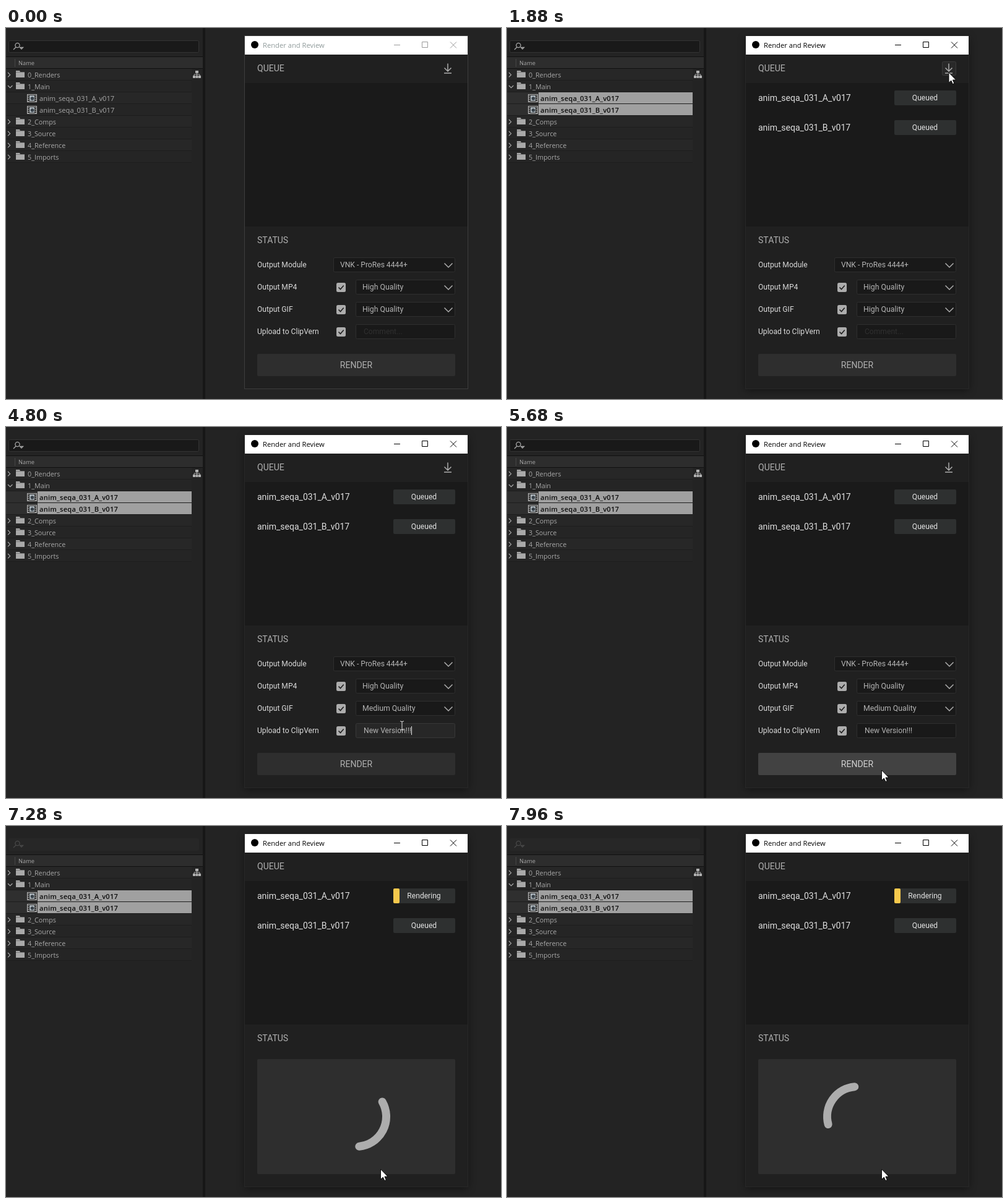
An HTML page for the animation above (8000 ms loop, 800x600 px).

```html
<!DOCTYPE html>
<html lang="en">
<head>
<meta charset="utf-8">
<title>Render queue</title>
<style>
  html, body { margin: 0; width: 100%; height: 100%; overflow: hidden; background: #232323; }
  svg { display: block; width: 800px; height: 600px; }
  text { white-space: pre; }
  .ui { font: 12.1px Roboto, sans-serif; }
  .quality { font-size: 12.3px; }
  .big { font: 14px Roboto, sans-serif; }
  .tree { font: 10.75px "Open Sans", sans-serif; fill: #a8a8a8; }
  .clip { font-size: 11.1px; }
  .picked { font-weight: 600; letter-spacing: .22px; fill: #0c0c0c; }
  .line { fill: none; stroke: #adadad; stroke-width: 1.5; }
  .off text { fill: #363636; }
  .off .box { stroke: none; }
  .off .chev { display: none; }
  .off .tick rect { fill: #343434; }
  .off .tick path { stroke: #1c1c1c; }
  .off .value { transform: translateX(-1px); }
</style>
</head>
<body>
<svg id="stage" viewBox="0 0 800 600"></svg>
<script>
const LOOP = 8000, STEP = 40;
const TYPED = 'New Version!!!';

const rect = (x, y, w, h, fill, more = '') =>
  `<rect x="${x}" y="${y}" width="${w}" height="${h}" fill="${fill}" ${more}/>`;
const text = (x, y, s, cls, fill, more = '') =>
  `<text x="${x}" y="${y}" class="${cls}" ${fill ? `fill="${fill}"` : ''} ${more}>${s}</text>`;
const line = (d, more = '', cls = '') => `<path class="line ${cls}" d="${d}" ${more}/>`;
const group = (id, body, more = '') => `<g id="${id}" ${more}>${body}</g>`;

// Project panel
const folder = y =>
  `<path d="M16 ${y - 7}h6l1 2h7v9h-14z" fill="#a9a9a9"/>` +
  rect(16, y - 5, 14, 0.8, '#6d6d6d');

const filmIcon = y =>
  rect(34.5, y - 6.5, 15, 12, '#2a2a2a', 'stroke="#b8b8b8"') +
  `<path d="M36.2 ${y - 5}v10M47.8 ${y - 5}v10" stroke="#b8b8b8" stroke-width="1.4" stroke-dasharray="1.4 1.6"/>` +
  rect(38, y - 5, 8, 9, '#a9b2b8') +
  `<circle cx="42.5" cy="${y}" r="2.8" fill="#39424a"/>`;

function treeRow(name, i) {
  const y = 76 + i * 19;
  const stripe = rect(0, y - 10, 300, 18, i % 2 ? '#252525' : '#272727') + rect(0, y + 8, 300, 1, '#1d1d1d');
  if (name.startsWith('anim')) {
    return stripe + filmIcon(y) + text(54, y + 4, name, 'tree clip') +
      group('pick' + i,
        rect(0, y - 10, 51, 18, '#2f2f2f') + rect(51, y - 10, 249, 18, '#a0a0a0') + filmIcon(y) +
        text(54, y + 4, name, 'tree clip picked'));
  }
  const arrow = i === 1 ? `M3 ${y - 2}l3.7 3.7l3.7 -3.7` : `M3 ${y - 4}l3.7 3.7l-3.7 3.7`;
  return stripe + line(arrow, 'style="stroke-width:1.1"') + folder(y) + text(35, y + 4, name, 'tree');
}

const tree = ['0_Renders', '1_Main', 'anim_seqa_031_A_v017', 'anim_seqa_031_B_v017',
  '2_Comps', '3_Source', '4_Reference', '5_Imports'];

const project =
  rect(0, 0, 800, 600, '#232323') +
  rect(4.5, 20.5, 307, 19, '#191919', 'id="search" rx="2" stroke="#343434"') +
  group('lens',
    '<circle cx="18.5" cy="28" r="3.6"/><path d="M16 31l-4 4"/><path d="M22.5 31.5h5l-2.5 2.5z"/>',
    'fill="none" stroke="#a8a8a8" stroke-width="1.3"') +
  rect(0, 46, 318, 1, '#101010') + rect(0, 47, 318, 18, '#2d2d2d') + rect(0, 65, 318, 1, '#101010') +
  rect(14, 50, 1, 13, '#464646') +
  text(20, 60, 'Name', 'tree', '', 'style="font-size:9.3px"') +
  tree.map(treeRow).join('') +
  rect(306, 69, 5, 4, '#b0b0b0') + rect(302, 77, 4, 4, '#b0b0b0') +
  rect(306.5, 77, 4, 4, '#b0b0b0') + rect(311, 77, 4, 4, '#b0b0b0') +
  line('M308.5 73v4M304 77v-2h9v2', 'style="stroke-width:1"') +
  rect(318, 0, 4, 600, '#171717');

// Tool window
const chevron = y => line(`M708.5 ${y - 2.5}l6.5 6.5l6.5 -6.5`, '', 'chev');
const field = (x, y, more = '') =>
  rect(x + 0.5, y - 11.5, 725 - x, 23, '#191919', `class="box" rx="2" stroke="#2f2f2f" ${more}`);
const combo = (x, y, value, cls = '', id = '') =>
  field(x, y) + text(x + 11, y + 4, value, `ui value ${cls}`, '#b4b4b4', id) + chevron(y);
const tick = y =>
  `<g class="tick">${rect(534, y - 7, 15, 15, '#adadad', 'rx="2.5"')}` +
  `<path d="M537.5 ${y + 0.5}l3 3l5.2 -6" fill="none" stroke="#1e1e1e" stroke-width="1.6"/></g>`;
const label = (y, s) => text(406, y + 4, s, 'ui', '#dadada');

const job = (y, name, id) =>
  text(406, y + 5, name, 'big', '#dedede') + rect(626, y - 12, 100, 24, '#2e3030', 'rx="2"') +
  (id ? rect(626, y - 12, 10, 24, '#f6c84c', 'id="bar" rx="2"') : '') +
  text(675.5, y + 4, 'Queued', 'ui', '#e2e2e2', `text-anchor="middle" ${id}`);

const option = (i, s) => text(576, 460 + i * 24, s, 'ui quality', '#a6a6a6', `id="opt${i}"`);

const win =
  rect(386, 13, 360, 570, '#202020', 'id="frame"') +
  rect(385.5, 12.5, 361, 571, 'none', 'id="edge"') +
  rect(386, 13, 360, 30, '#fff') +
  '<circle cx="402" cy="27" r="6" fill="#000"/>' +
  group('caption',
    text(415, 32, 'Render and Review', '', '', 'style="font:11.2px \'Open Sans\',sans-serif" stroke="none"') +
    '<path d="M627 27.5h10M672.5 22.5h9v9h-9zM718 22.5l10 10M728 22.5l-10 10" fill="none"/>') +
  rect(386, 89, 360, 232, '#1a1a1a') +
  text(406, 70, 'QUEUE', 'big', '#b0b0b0') +
  rect(703.5, 54.5, 22, 22, '#292929', 'id="addHot" rx="2" stroke="#3b3b3b"') +
  group('add', line('M714 57.5v12.5M708.5 64.5l5.5 5.5l5.5 -5.5M708 73h12')) +
  group('jobs', job(113, tree[2], 'id="state"') + job(161, tree[3], '')) +
  text(406, 348, 'STATUS', 'big', '#b0b0b0') +
  group('form',
    label(383, 'Output Module') + combo(529, 383, 'VNK - ProRes 4444+') +
    label(419, 'Output MP4') + tick(419) + combo(565, 419, 'High Quality', 'quality') +
    label(455, 'Output GIF') + tick(455) + combo(565, 455, 'High Quality', 'quality', 'id="gif"') +
    label(491, 'Upload to ClipVern') + tick(491) + field(565, 491, 'id="note"') +
    text(578, 495, '', 'ui value', '', 'id="comment"')) +
  rect(655, 484, 1, 14, '#e6e6e6', 'id="caret"') +
  rect(406, 527, 320, 36, '#2e2e2e', 'id="panel" rx="2"') +
  text(566, 550, 'RENDER', 'big', '#b0b0b0', 'id="go" text-anchor="middle"') +
  '<path id="spin" fill="none" stroke="#adadad" stroke-width="13" stroke-linecap="round"/>' +
  group('menu',
    rect(565.5, 443.5, 160, 73, '#1a1a1a', 'stroke="#2f2f2f" style="filter:drop-shadow(1px 2px 2px #0008)"') +
    rect(566, 444, 159, 24, '#2e2e2e', 'id="hot"') +
    option(0, 'High Quality') + option(1, 'Medium Quality') + option(2, 'Low Quality'));

const pointers =
  '<path id="arrow" d="M0 0V16.5L3.8 13L6.3 18.6L8.8 17.5L6.4 12H11.6Z" fill="#fff" stroke="#000" stroke-width=".9"/>' +
  '<path id="beam" d="M-3 -7h2l1 1l1 -1h2M0 -6v12M-3 7h2l1 -1l1 1h2" fill="none" stroke="#e4e4e4"/>';

document.getElementById('stage').innerHTML = project + win + pointers;

const el = {};
document.querySelectorAll('[id]').forEach(e => el[e.id] = e);
const set = (id, attrs) => { for (const k in attrs) el[id].setAttribute(k, attrs[k]); };
const show = (id, on) => { el[id].style.display = on ? '' : 'none'; };
const write = (id, s) => { if (el[id].textContent !== s) el[id].textContent = s; };

const clamp = v => Math.max(0, Math.min(1, v));
const part = (t, a, b) => clamp((t - a) / (b - a));
const ease = p => p * p * (3 - 2 * p);

// time, x, y
const path = [
  [40, 664, 601], [720, 150, 111], [960, 150, 111], [1080, 150, 130], [1120, 150, 130],
  [1760, 714, 72], [2040, 714, 72], [2880, 614, 461], [3040, 614, 461], [3200, 614, 472],
  [3320, 614, 472], [3680, 640, 483], [5160, 640, 483], [5480, 605.5, 555], [LOOP, 605.5, 555]
];

function pointerAt(t) {
  const i = path.findIndex(k => k[0] > t);
  if (i < 1) return path[0].slice(1);
  const [t0, x0, y0] = path[i - 1], [t1, x1, y1] = path[i];
  const p = ease(part(t, t0, t1));
  return [x0 + (x1 - x0) * p, y0 + (y1 - y0) * p];
}

const polar = deg => {
  const a = deg * Math.PI / 180;
  return `${(566 + 48.5 * Math.cos(a)).toFixed(2)} ${(470 + 48.5 * Math.sin(a)).toFixed(2)}`;
};

function drawPointer(t) {
  const [x, y] = pointerAt(t);
  const inField = t > 3360 && t < 5400 && y > 479 && y < 503;
  show('arrow', t >= 80 && !inField);
  show('beam', inField);
  set(inField ? 'beam' : 'arrow', { transform: `translate(${x.toFixed(1)} ${y.toFixed(1)})` });
  show('addHot', x > 703 && y > 54 && y < 78);
  return y;
}

function drawForm(t, y) {
  const busy = t >= 6680;
  const open = t >= 2920 && t < 3360;
  const mid = t >= 3200 ? 1 : 0;
  const focus = t >= 3680 && t < 5680;
  const count = t < 3840 ? 0
    : t < 4720 ? 1 + Math.floor(part(t, 3840, 4640) * 11) : t < 4800 ? 13 : 14;

  set('form', { class: busy ? 'off' : '', opacity: 1 - part(t, 6720, 6960) });
  show('menu', open);
  set('hot', { y: 444 + mid * 24 });
  [0, 1, 2].forEach(i => set('opt' + i, { fill: i === mid ? '#e2e2e2' : '#a6a6a6' }));
  write('gif', t < 3360 ? 'High Quality' : 'Medium Quality');

  write('comment', count ? TYPED.slice(0, count) : 'Comment...');
  set('comment', { fill: count ? '#b4b4b4' : '#303030' });
  set('note', { fill: focus ? '#272727' : '#191919', stroke: focus ? '#383838' : '#2f2f2f' });
  show('caret', focus);
  set('caret', { x: count ? 578 + Math.round(el.comment.getComputedTextLength()) : 578 });

  const hover = t > 5200 && t < 6680 && y > 527;
  const press = t >= 5680 && t < 5720;
  const top = 527 - 150 * ease(part(t, 6720, 7120));
  set('panel', { y: top, height: 563 - top, fill: press ? '#424242' : hover ? '#343434' : '#2e2e2e' });
  set('go', { fill: hover ? '#d0d0d0' : '#b0b0b0' });
  show('go', !busy);
}

function drawSpinner(t) {
  show('spin', t > 7120);
  if (t <= 7120) return;
  const mid = 23 + 3e-4 * Math.max(0, t - 7160) ** 2;
  const half = (57 - 7 * part(t, 7280, 7960)) * part(t, 7080, 7240);
  set('spin', { d: `M${polar(mid - half)}A48.5 48.5 0 0 1 ${polar(mid + half)}` });
}

function draw(t) {
  const active = t >= 1800;
  show('pick2', t >= 800);
  show('pick3', t >= 1080);
  set('caption', { fill: active ? '#000' : '#8f9a9a', stroke: active ? '#000' : '#9a9a9a' });
  set('edge', { stroke: active ? '#282828' : '#3d3d3d' });
  el.frame.style.filter = active ? 'drop-shadow(0 3px 7px #0007)' : '';

  show('jobs', t >= 1840);
  show('add', t < 6680);
  write('state', t < 6680 ? 'Queued' : 'Rendering');
  show('bar', t >= 7200);

  const idle = t < 6720;
  set('search', { fill: idle ? '#191919' : '#272727', stroke: idle ? '#343434' : '#272727' });
  set('lens', { stroke: idle ? '#a8a8a8' : '#484848' });

  drawForm(t, drawPointer(t));
  drawSpinner(t);
}

const start = performance.now();
function tickFrame() {
  const t = (performance.now() - start) % LOOP;
  draw(Math.floor(t / STEP) * STEP);
  requestAnimationFrame(tickFrame);
}
tickFrame();
</script>
</body>
</html>
```
